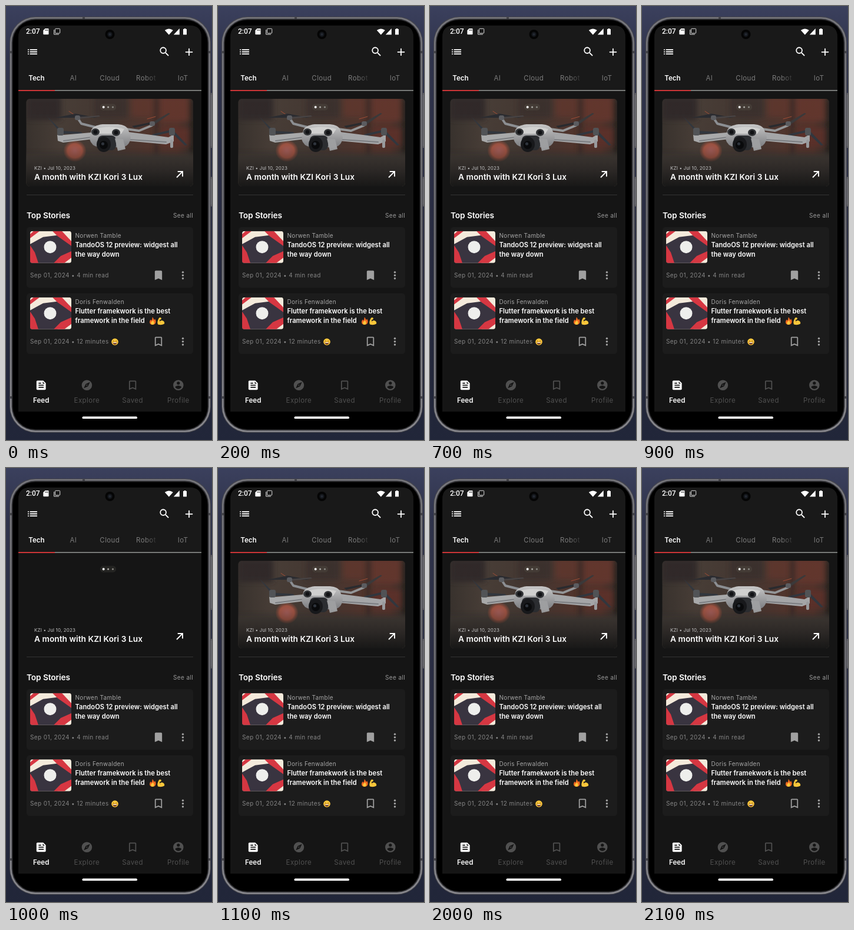
An HTML page for the animation above (2300 ms loop, 350 by 734 pixels).

```html
<!DOCTYPE html>
<html lang="en">
<head>
<meta charset="utf-8">
<title>News feed app</title>
<style>
html, body { margin: 0; width: 100%; height: 100%; overflow: hidden; background: #272a40; }
svg { display: block; width: 350px; height: 734px; }
text { font-family: Inter, sans-serif; white-space: pre; }
.time { font: 500 12px Roboto, sans-serif; fill: #fff; }
.tab { font-size: 11.5px; letter-spacing: .4px; fill: #7b7b7b; }
.on { font-weight: 600; letter-spacing: .05px; fill: #fff; }
.nav { fill: #505050; }
.nav.on { fill: #fff; }
.head { font-size: 13.7px; font-weight: 600; letter-spacing: -.1px; fill: #fff; }
.hero { letter-spacing: .05px; }
.meta { font-size: 8px; letter-spacing: .15px; fill: #c4c4c4; }
.small { font-size: 10px; letter-spacing: .4px; fill: #858585; }
.author { font-size: 10px; letter-spacing: .3px; fill: #a6a6a6; }
.title { font-size: 11.2px; font-weight: 600; fill: #fff; }
</style>
</head>
<body>
<svg id="stage" viewBox="0 0 350 734" xmlns="http://www.w3.org/2000/svg">
<defs>
  <linearGradient id="wall" x2="0" y2="1">
    <stop offset="0" stop-color="#3b405d"/><stop offset=".12" stop-color="#2f334b"/>
    <stop offset=".6" stop-color="#272a3f"/><stop offset="1" stop-color="#212639"/>
  </linearGradient>
  <linearGradient id="rim" x2="0" y2="1">
    <stop offset="0" stop-color="#77777d"/><stop offset=".5" stop-color="#6c6c72"/>
    <stop offset="1" stop-color="#88888e"/>
  </linearGradient>
  <linearGradient id="brick">
    <stop offset="0" stop-color="#3b342f"/><stop offset=".2" stop-color="#4b4039"/>
    <stop offset=".5" stop-color="#463832"/><stop offset=".72" stop-color="#54372f"/>
    <stop offset=".9" stop-color="#57342c"/><stop offset="1" stop-color="#38302c"/>
  </linearGradient>
  <linearGradient id="shade" x2="0" y2="1">
    <stop offset="0" stop-color="#151515" stop-opacity=".05"/>
    <stop offset=".55" stop-color="#151515" stop-opacity=".08"/>
    <stop offset=".8" stop-color="#151515" stop-opacity=".5"/>
    <stop offset="1" stop-color="#151515" stop-opacity=".95"/>
  </linearGradient>
  <linearGradient id="shell" x2="0" y2="1">
    <stop offset="0" stop-color="#d3d3d3"/><stop offset="1" stop-color="#85868a"/>
  </linearGradient>
  <radialGradient id="ball">
    <stop offset="0" stop-color="#a8605c"/><stop offset=".65" stop-color="#a65644"/>
    <stop offset="1" stop-color="#8a4a3a" stop-opacity=".2"/>
  </radialGradient>
  <linearGradient id="fade" gradientUnits="userSpaceOnUse" x1="236" x2="258">
    <stop offset="0" stop-color="#7b7b7b"/><stop offset="1" stop-color="#7b7b7b" stop-opacity=".12"/>
  </linearGradient>
  <filter id="blur" x="-50%" y="-50%" width="200%" height="200%"><feGaussianBlur stdDeviation="4"/></filter>
  <filter id="soft"><feGaussianBlur stdDeviation=".5"/></filter>
  <clipPath id="heroBox"><rect x="34.5" y="157" width="283.5" height="148" rx="6"/></clipPath>
  <clipPath id="thumbBox"><rect width="70" height="54" rx="4"/></clipPath>
</defs>
</svg>
<script>
const stage = document.getElementById('stage');
const LOOP = 2300, GAP_START = 1000, GAP_END = 1100;

const rect = (x, y, w, h, fill, r = 0) =>
  `<rect x="${x}" y="${y}" width="${w}" height="${h}" rx="${r}" fill="${fill}"/>`;
const dot = (x, y, r, fill) => `<circle cx="${x}" cy="${y}" r="${r}" fill="${fill}"/>`;
const oval = (x, y, rx, ry, fill) => `<ellipse cx="${x}" cy="${y}" rx="${rx}" ry="${ry}" fill="${fill}"/>`;
const path = (d, fill) => `<path d="${d}" fill="${fill}"/>`;
const line = (d, color, w) =>
  `<path d="${d}" fill="none" stroke="${color}" stroke-width="${w}" stroke-linecap="round" stroke-linejoin="round"/>`;
const text = (x, y, cls, s, extra = '') => `<text x="${x}" y="${y}" class="${cls}" ${extra}>${s}</text>`;
const mid = 'text-anchor="middle"';

const ICONS = {
  list: 'M3 13h2v-2H3zm0 4h2v-2H3zm0-8h2V7H3zm4 4h14v-2H7zm0 4h14v-2H7zM7 7v2h14V7z',
  search: 'M15.5 14h-.79l-.28-.27A6.5 6.5 0 1 0 13.73 14.43l.27.28v.79l5 4.99L20.49 19zm-6 0a4.5 4.5 0 1 1 0-9 4.5 4.5 0 0 1 0 9z',
  add: 'M19 13h-6v6h-2v-6H5v-2h6V5h2v6h6z',
  mark: 'M17 3H7c-1.1 0-2 .9-2 2v16l7-3 7 3V5c0-1.1-.9-2-2-2z',
  markLine: 'M17 3H7c-1.1 0-2 .9-2 2v16l7-3 7 3V5c0-1.1-.9-2-2-2zm0 15l-5-2.18L7 18V5h10z',
  feed: 'M16 3H5c-1.1 0-2 .9-2 2v14c0 1.1.9 2 2 2h14c1.1 0 2-.9 2-2V8zM7 7h5v2H7zm10 10H7v-2h10zm0-4H7v-2h10zm-2-4V5l4 4z',
  explore: 'M12 2a10 10 0 1 0 0 20 10 10 0 0 0 0-20zm2.19 12.19L6 18l3.81-8.19L18 6zM12 10.9a1.1 1.1 0 1 0 0 2.2 1.1 1.1 0 0 0 0-2.2z',
  person: 'M12 2a10 10 0 1 0 0 20 10 10 0 0 0 0-20zm0 3a3 3 0 1 1 0 6 3 3 0 0 1 0-6zm0 14.2c-2.5 0-4.71-1.28-6-3.22.03-1.99 4-3.08 6-3.08s5.97 1.09 6 3.08c-1.29 1.94-3.5 3.22-6 3.22z'
};
const icon = (name, x, y, fill, k = .88) =>
  `<path transform="translate(${x - 12 * k} ${y - 12 * k}) scale(${k})" d="${ICONS[name]}" fill="${fill}" fill-rule="evenodd"/>`;

function phone() {
  const shell = (inset, fill) =>
    rect(6 + inset, 18 + inset, 342 - 2 * inset, 703.5 - 2 * inset, fill, 44 - inset);
  const buttons = rect(346, 147, 6, 93, '#5d5d64', 2) + rect(346, 289, 6, 50, '#5d5d64', 2) +
    rect(347, 150, 1.5, 87, '#85858c') + rect(347, 292, 1.5, 44, '#85858c');
  const bands = rect(6, 76, 4, 4, '#45454b') + rect(6, 660, 4, 4, '#45454b') +
    rect(130, 18, 4, 4, '#45454b') + rect(344, 76, 4, 4, '#45454b') + rect(344, 660, 4, 4, '#45454b');
  return rect(0, 0, 350, 734, 'url(#wall)') + buttons +
    shell(0, '#48484d') + shell(1, 'url(#rim)') + bands +
    shell(3.6, '#303033') + shell(5.4, '#000') +
    path('M21 686V53Q21 33 41 33H312Q332 33 332 53V686Z', '#151515') +
    path('M21 142V53Q21 33 41 33H312Q332 33 332 53V142Z', '#191919') +
    rect(129.5, 694.3, 93.5, 3.8, '#fff', 1.9);
}

function statusBar() {
  return text(34, 47, 'time', '2:07') +
    path('M66.5 38H71.5Q72.5 38 72.5 39V47.3Q72.5 48.3 71.5 48.3H64.3Q63.3 48.3 63.3 47.3V41.2Z', '#fff') +
    [66.6, 68.5, 70.4].map(x => rect(x, 39.6, .9, 2.3, '#191919')).join('') +
    `<rect x="83.5" y="38.3" width="8.2" height="7.8" rx="1" fill="none" stroke="#ddd"/>` +
    line('M81.6 40.5V48H89.5', '#ddd', 1) +
    dot(176.5, 48, 8, '#050505') + dot(176.5, 48, 4.2, '#14171c') + dot(176.5, 48, 2, '#252a33') +
    path('M269.8 41Q276.8 35.8 283.8 41L276.8 48.7Z', '#fff') +
    path('M294.8 38V48.4H284.8Z', '#fff') +
    path('M302.7 38H305.3V39H307V48.4H301V39H302.7Z', '#fff');
}

function header() {
  const tabs = [[114.3, 'AI'], [176.3, 'Cloud'], [300.5, 'IoT']];
  return icon('list', 45, 77.5, '#fff') + icon('search', 269.3, 77.3, '#fff') + icon('add', 311, 77.8, '#fff') +
    text(52, 126, 'tab on', 'Tech', mid) +
    tabs.map(([x, s]) => text(x, 126, 'tab', s, mid)).join('') +
    text(221, 126, 'tab', 'Robot', 'style="fill:url(#fade)"') +
    rect(83, 142, 249, 1.6, '#8d908d') + rect(21, 142, 62, 1.8, '#e0393b');
}

function drone() {
  return `<g filter="url(#soft)">` +
    path('M84 189L118 182 156 189 120 189Z', '#2c2d32') + path('M121 188L158 185 160 187 122 191Z', '#4b4646') +
    path('M70 187L94 210 91 213Z', '#343941') + path('M93 211L128 213 130 216 93 216Z', '#343941') +
    path('M214 203L249 196 250 199 218 206Z', '#2b2c30') + path('M250 196L276 181 279 182 253 200Z', '#3d3b3c') +
    path('M248 217L282 209 283 213 250 220Z', '#343941') + path('M283 209L308 235 304 236 281 214Z', '#343941') +
    line('M122 190L128 199 152 205', '#94979b', 4) + line('M248 202L226 211 204 208', '#9d9fa1', 4) +
    path('M87 218L98 218 144 214 148 225 97 231 88 228Z', '#b4b5b6') +
    path('M208 213L276 222 285 217 285 229 272 234 206 228Z', '#b0b1b3') +
    line('M98 228L145 222M210 226L272 230', '#84868a', 2) +
    rect(87, 206, 11, 13, '#56585b', 3) + rect(277, 206, 10, 13, '#55575a', 3) + rect(279, 226, 5, 14, '#a4a5a8', 2) +
    rect(117, 185, 9, 8, '#606165', 3) + rect(244, 195, 9, 8, '#606165', 3) +
    path('M145 210Q148 202 164 200H190Q205 201 208 210L212 222Q210 238 196 239H158Q145 237 142 225Z', 'url(#shell)') +
    path('M151 208Q175 201 201 208L196 216H156Z', '#dededd') +
    oval(152, 213, 7, 6, '#343639') + oval(187, 214, 7, 6, '#343639') +
    dot(152, 213, 3.6, '#111215') + dot(187, 214, 3.6, '#111215') +
    rect(156, 219, 31, 25, '#2d2f33', 8) + oval(166, 234, 12, 13, '#18191c') +
    dot(166, 235, 7, '#08090b') + dot(164.5, 233, 2.6, '#30363f') +
    path('M185 224L199 225 203 242 190 245Z', '#a9aaac') + '</g>';
}

function photo() {
  return `<g id="photo" clip-path="url(#heroBox)">` + rect(34, 157, 285, 149, 'url(#brick)') +
    `<g filter="url(#blur)">` + rect(34, 153, 60, 40, '#302b29') + rect(150, 153, 56, 36, '#3d322e') +
    rect(214, 153, 36, 34, '#61372e') + rect(262, 153, 48, 42, '#66382e') + rect(264, 206, 46, 30, '#613329') +
    rect(252, 153, 7, 110, '#3b2a26') + rect(313, 157, 10, 148, '#26211f') +
    rect(28, 250, 300, 60, '#453d38') + '</g>' +
    oval(117, 245, 19, 18, 'url(#ball)') + line('M107 178L116 184M240 191L254 187M293 223L301 230', '#aa5139', 1) +
    drone() + rect(34, 157, 285, 149, 'url(#shade)') + '</g>';
}

function hero() {
  return photo() + rect(160, 165.5, 27, 11, 'rgba(120,120,108,.16)', 5) +
    dot(165.7, 171, 2, '#fff') + dot(173.6, 171, 1.6, '#aaa8a3') + dot(181.5, 171, 1.6, '#8a8883') +
    text(48, 276.5, 'meta', 'KZI • Jul 10, 2023') +
    text(48, 293.6, 'head hero', 'A month with KZI Kori 3 Lux') +
    `<path d="M290 290L299.3 280.7M291.7 280H300V288.4" fill="none" stroke="#fff" stroke-width="1.9"/>` +
    rect(35, 319, 283, 1, '#343434') +
    text(35, 358.6, 'head', 'Top Stories') + text(284, 357.5, 'small', 'See all', 'style="fill:#999"');
}

function thumb(y) {
  const red = '#d63742', cream = '#f4eadb';
  return `<g transform="translate(41 ${y})" clip-path="url(#thumbBox)">` + rect(0, 0, 70, 54, cream) +
    path('M0 22L22 10 46 7 70 22V40L46 54H0Z', '#393440') +
    path('M0 12L16 0H6L0 5Z', red) + path('M38 0H54L70 17V25L46 8Z', red) +
    path('M0 24L8 36 14 54H0Z', red) + path('M40 54L52 42 70 34V45L58 54Z', red) +
    dot(34, 27, 10.5, '#eeeeec') + '</g>';
}

function card(y, author, titles, date, saved) {
  return rect(35, y, 283, 102.5, '#1c1c1c', 5) + thumb(y + 6.7) +
    text(117.5, y + 18, 'author', author) +
    titles.map((s, i) => text(117.5, y + 34 + i * 16.4, 'title', s)).join('') +
    text(41, y + 85, 'small', date) +
    icon(saved ? 'mark' : 'markLine', 259, y + 81.5, '#a0a0a0') +
    [-5.3, 0, 5.3].map(d => dot(300.5, y + 81.5 + d, 1.7, '#a0a0a0')).join('');
}

const flame = (x, y) => `<g transform="translate(${x} ${y})">` +
  path('M6 0C8 3 8 4 9 5Q10 4 10 3C13 7 12 13 6 13C0 13 0 7 3 4Q3 6 4 6C6 4 5 2 6 0Z', '#f26a21') +
  path('M6.3 5.5C10 9 9.3 13 6 13C3 13 2.5 10 4 8Q5 8.5 6.3 5.5Z', '#ffc83b') + '</g>';

const muscle = (x, y) => `<g transform="translate(${x} ${y})">` +
  path('M3 1Q6-1 7 2L6 4H4L4 7Q7 4 10 6Q13 8 12 11Q7 14 1 12Q-1 8 3 1Z', '#ffc83b') +
  line('M4 7Q6 8 6 9', '#d9972b', .8) + '</g>';

const grin = (x, y) => dot(x, y, 5.8, '#ffc83b') +
  line(`M${x - 3.2} ${y - 1}q1-2 2 0M${x + 1.2} ${y - 1}q1-2 2 0`, '#5b3a16', .9) +
  path(`M${x - 3.6} ${y + .8}h7.2q-.6 3.8-3.6 3.8t-3.6-3.8z`, '#6a3420') + rect(x - 2.8, y + .9, 5.6, 1.1, '#fff');

function stories() {
  return card(374, 'Norwen Tamble', ['TandoOS 12 preview: widgest all', 'the way down'], 'Sep 01, 2024 • 4 min read', true) +
    card(486, 'Doris Fenwalden', ['Flutter framekwork is the best', 'framework in the field'], 'Sep 01, 2024 • 12 minutes', false) +
    flame(243, 526) + muscle(257, 526.5) + grin(185, 568);
}

function navBar() {
  const items = [['feed', 59.7, 'Feed'], ['explore', 137.4, 'Explore'], ['markLine', 215.1, 'Saved'], ['person', 292.8, 'Profile']];
  return items.map(([name, x, label], i) =>
    icon(name, x, 641.3, i ? '#505050' : '#fff') +
    text(x, 671, i ? 'tab nav' : 'tab nav on', label, mid)).join('');
}

stage.insertAdjacentHTML('beforeend', phone() + statusBar() + header() + hero() + stories() + navBar());
const picture = document.getElementById('photo');
const start = performance.now();

function render(t) {
  const hidden = t >= GAP_START && t < GAP_END;
  picture.setAttribute('visibility', hidden ? 'hidden' : 'visible');
}

function tick() {
  render((performance.now() - start) % LOOP);
  requestAnimationFrame(tick);
}
tick();
</script>
</body>
</html>
```
